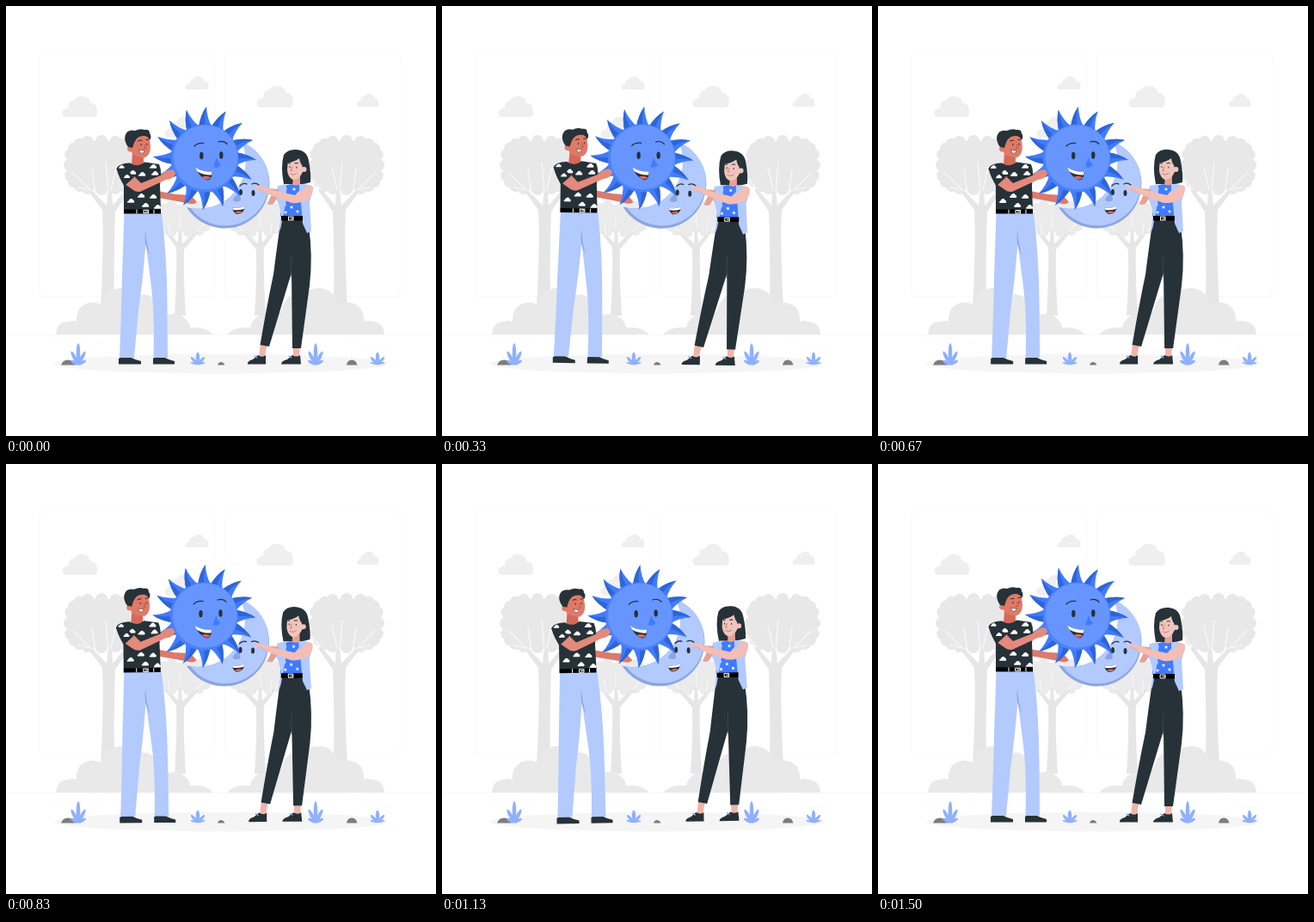
Animation of 500 by 500 pixels, one loop 1540 ms. Source, as an HTML page:

```html
<!DOCTYPE html>
<html lang="en">
<head>
<meta charset="utf-8">
<title>Sun and moon</title>
<style>
html, body { margin: 0; width: 100%; height: 100%; overflow: hidden; background: #fff; }
svg { display: block; width: 100vw; height: 100vh; }
.line { fill: none; stroke-linecap: round; stroke-linejoin: round; }
</style>
</head>
<body>
<svg viewBox="0 0 500 500">
  <defs>
    <path id="cloud" d="M4 24a4.500 4.500 0 0 1-1-8.500Q5 13 8 13.500Q7 5 14 5Q18-1 25 0Q32 1 33 8Q41 8 41 17Q42 24 37 24z"/>
    <path id="star" d="M0-3L.8-1 3-.9 1.3.5 1.9 2.6 0 1.4-1.9 2.6-1.3.5-3-.9-.8-1z"/>
    <g id="plant" fill="#8fb0ff">
      <ellipse cy="-13" rx="2.300" ry="12"/>
      <ellipse cy="-9" rx="2.100" ry="8.500" transform="rotate(-28)"/>
      <ellipse cy="-9" rx="2.100" ry="8.500" transform="rotate(28)"/>
      <ellipse cy="-5" rx="1.800" ry="5" transform="rotate(-62)"/>
      <ellipse cy="-5" rx="1.800" ry="5" transform="rotate(62)"/>
    </g>
    <g id="bigTree">
      <g id="bigLeaves" fill="#e8e8e8"/>
      <path fill="#e6e6e6" d="M110 350Q114 280 112 237L95 214l3-2 19 20 2-20h4l1 20 17-20 3 2-17 25Q125 290 126 350z"/>
      <path class="line" stroke="#f5f5f5" stroke-width="1.6" d="M98 214L78 194M104 219L100 190M99 214L84 211M119 216L116 182M122 214L128 188M141 213L153 198"/>
    </g>
    <g id="smallTree">
      <g id="smallLeaves" fill="#ebebeb"/>
      <path fill="#e6e6e6" d="M196 360Q199 310 198 281L184 262l2-2 14 15 1-17h3l1 18 17-15 2 2-17 20Q206 315 209 360z"/>
      <path class="line" stroke="#f5f5f5" stroke-width="1.3" d="M185 262L177 251M190 266L189 251M202 260V242M222 262L231 252"/>
    </g>
    <path id="bush" fill="#e9e9e9" d="M58 382q1-15 15-15q4-2 9 0q-1-19 16-22q8-1 13 3q4-18 22-20q14 0 19 9q20-7 26 18q4 3 5 6q12-6 22 0q8 5 9 13q18-2 27 8z"/>
    <clipPath id="crescent"><path d="M274 158A52.200 52.200 0 1 1 210 234A55 55 0 0 0 274 158z"/></clipPath>
  </defs>

  <g fill="none" stroke="#ebebeb" stroke-width=".3">
    <rect x="38.5" y="55" width="204" height="282.6" rx="5.6"/>
    <rect x="254.7" y="55" width="204" height="282.6" rx="5.6"/>
    <path d="M0 382.4H500M417 398.6h33M322 401.3h9M396.6 389.3h19M52.5 391h43M104.6 391h6M131.5 395.2h94"/>
  </g>
  <g fill="#efefef">
    <use href="#cloud" transform="translate(65 105)"/>
    <use href="#cloud" transform="translate(208 82) scale(.67 .63)"/>
    <use href="#cloud" transform="translate(291 93) scale(1.04)"/>
    <use href="#cloud" transform="translate(407.500 102) scale(.63)"/>
    <use href="#cloud" transform="translate(184 129)"/>
  </g>
  <use href="#bigTree"/>
  <use href="#bigTree" transform="matrix(-1 0 0 1 507 0)"/>
  <use href="#smallTree"/>
  <use href="#smallTree" transform="matrix(-1 0 0 1 498 0)"/>
  <use href="#bush"/>
  <use href="#bush" transform="matrix(-1 0 0 1 498 0)"/>

  <ellipse cx="250" cy="416" rx="194" ry="11.2" fill="#f5f5f5"/>
  <path fill="#7d7d7d" d="M64 417.500q2-6 8-6q6 0 9 6zM246 417.500q1-3.500 4-3.500t4.500 3.500zM396 417.500q1-6 6-6t6.500 6z"/>
  <use href="#plant" transform="translate(84 417)"/>
  <use href="#plant" transform="translate(223 417) scale(.95 .58)"/>
  <use href="#plant" transform="translate(360 417)"/>
  <use href="#plant" transform="translate(432 417) scale(.95 .58)"/>

  <g id="sway">
    <g id="moon">
      <g clip-path="url(#crescent)">
        <circle cx="257" cy="208" r="56" fill="#8ca5e2"/>
        <circle cx="255" cy="204.500" r="50.800" fill="#b3caff"/>
      </g>
      <path fill="#8ca5e2" d="M272 217Q264 222 264 226Q268 229 273 226z"/>
      <g fill="#263238">
        <ellipse cx="273" cy="216.500" rx="2" ry="3.500"/>
        <ellipse cx="287.500" cy="217.500" rx="2" ry="3.500"/>
        <path d="M263 234.500Q271 236 278 232.500Q277 242 268 242Q264 240 263 234.500z"/>
      </g>
      <path fill="#fff" d="M263 234.500Q271 236 278 232.500L277 236Q270 238 264 237z"/>
      <path fill="#e0685c" d="M266 240.500Q270 237 275 239.500Q271 242.500 266 240.500z"/>
      <path class="line" stroke="#263238" stroke-width="1.300" d="M272 209Q276 205 280 207M286 207Q290 205 294 208"/>
    </g>

    <path id="backArm" fill="#dc7a6b" d="M176 215L198 219Q209 219 216 221L222 228Q220 231 214 230L199 227L177 223z"/>

    <g id="sun">
      <g id="rays"/>
      <circle cx="231" cy="177" r="39.500" fill="#4a82f7"/>
      <circle cx="232" cy="176" r="37.500" fill="#6695ff"/>
      <path fill="#407bff" d="M245 176Q246 181 250 185Q247 189 241 187z"/>
      <g fill="#263238">
        <ellipse cx="227.300" cy="174" rx="2.200" ry="4.200"/>
        <ellipse cx="250.300" cy="173.500" rx="2.200" ry="4.200"/>
        <path d="M220 187.500Q229 193.500 239.500 192.500Q240 202 234 202.500Q225 199.500 220 187.500z"/>
      </g>
      <path fill="#fff" d="M220 187.500Q229 193.500 239.500 192.500L239 196.500Q230 197 222.500 192.500z"/>
      <path fill="#e0685c" d="M228 199Q232 196.500 238.500 199.500Q234 204 228 199z"/>
      <path class="line" stroke="#263238" stroke-width="1.200" d="M219 163Q223 158.500 230 159.500M247 158Q253 156 257 160.500"/>
    </g>

    <g id="man">
      <path fill="#263238" d="M131 416.500V410L134 408.500H145Q151 412 157 413V416.500zM171 416.500V410L173 408.500H184Q190 412 196 413V416.500z"/>
      <path fill="#b3caff" d="M137.500 241H181Q187 290 187.500 345L188 409H171.500Q173 360 169 327L162.500 276Q159 320 154.500 350L149 409H132Q134 360 135 315z"/>
      <path fill="#8ca5e2" d="M162 261Q161 275 163 280L167 290Q163 276 162 261z"/>
      <path fill="#d5695a" d="M147 172H160V185Q153 189 146 184z"/>
      <path fill="#263238" d="M144 182.500Q131 183 128.500 189L137 209V237H180L179 208Q182 193 178 184L161 181.500Q153 188.500 144 182.500z"/>
      <g id="shirtClouds" fill="#fff"/>
      <path fill="#000" d="M137 236.500H180V241.500H137z"/>
      <path class="line" stroke="#fff" stroke-width="1" d="M160 237.300h5.500v3.500H160zM162 239h2.500M152 237v4M172 237v4"/>
      <path fill="#e4897b" d="M138 207L149 198L157 206L180 197Q185 191 193 190Q197 192 197 195Q195 201 186 202L157 215.500Q152 217 148 214z"/>
      <path fill="#263238" d="M128.500 189Q133 186 139 189L149 199L138 209Q132 202 128.500 189z"/>
      <g fill="#fff">
        <use href="#cloud" transform="translate(131 185) scale(.16)"/>
        <use href="#cloud" transform="translate(137 196) scale(.17)"/>
      </g>
      <path fill="#e07a66" d="M144 155Q154 146 166 150L168 163Q168 173 162 176Q154 177 147 172Q143 165 144 155z"/>
      <circle cx="144.500" cy="166" r="3.400" fill="#e07a66"/>
      <path fill="#263238" d="M142 164Q137 157 138.500 151Q141 143 150 145Q156 142 161 144Q167 143 167 148Q170 152 167 156Q165 151 160 151Q152 151 149 159L147 165z"/>
      <path class="line" stroke="#263238" stroke-width="1" d="M154 157Q156 155.500 158 156.500M163 155.500h2.500M157 160.500v1.500M164 160v1.500"/>
      <path class="line" stroke="#c95549" stroke-width="1" d="M161 161L163 165.500H160"/>
      <path fill="#fff" stroke="#263238" stroke-width=".5" d="M154.500 167Q158 169 161 167.500Q160 172 156.500 171z"/>
    </g>

    <g id="woman">
      <path fill="#f0b4aa" d="M296 392H304L301 407H294zM334 395H342L341 408H334z"/>
      <path fill="#263238" d="M281 416.500Q280 413 287 411L293 406Q298 409 302 406L302 416.500zM320 416.500Q320 413 327 411L333 406Q338 409 342 406L343 416.500z"/>
      <path class="line" stroke="#7ea3ff" stroke-width="1.200" d="M289 407l3 2M329 407l3 2"/>
      <path fill="#263238" d="M320 248H345L352 256Q357 290 353 325L343 398H333L332 310L306 396L295.500 394Q303 350 311 312Q317 265 320 248z"/>
      <path class="line" stroke="#37474f" stroke-width="1" d="M332 290Q331 302 332 315"/>
      <path fill="#263238" d="M323 173Q328 166 338 167Q350 168 352 180Q355 195 354 205Q345 208 336 207H323Q319 187 323 173z"/>
      <path fill="#e6a195" d="M334 198H342V209Q338 213 333 209z"/>
      <path fill="#efc5bd" d="M328 178Q335 174 344 178L345 193Q341 202 334 202Q328 200 327 191z"/>
      <circle cx="346.500" cy="190" r="3" fill="#efc5bd"/>
      <path fill="#263238" d="M326 183Q329 170 340 171Q347 174 346 187Q342 184 341 177Q336 181 326 183z"/>
      <path class="line" stroke="#263238" stroke-width="1" d="M328.500 183h2M336 183q2-1 3.500 0M330 186.500v1.200M338 187v1.200"/>
      <path class="line" stroke="#d97f73" stroke-width="1" d="M333 187L331 191.500H333M331 195Q335 197.500 338 194.500"/>
      <path fill="#407bff" d="M322 209L332 207Q337 210 342 207L349 209L345 245H319z"/>
      <g id="stars" fill="#fff"/>
      <path fill="#b3caff" d="M326 207L316 209L313 222L317 230L320 242L317 262Q319 263 321 250L326 225zM341 207L353 208L357 214L353 228L355 262L350 264L345 253Q343 230 341 207z"/>
      <path fill="#000" d="M320 244H345V249.500H320z"/>
      <path class="line" stroke="#fff" stroke-width="1" d="M328.500 245h5.500v4h-5.500zM331 247h3"/>
      <path fill="#e6a195" d="M318 219L311 230Q307 232 304 230L309 219L304 212L317 213z"/>
      <path fill="#f3beb4" d="M346 209Q353 207 357 210Q358 219 351 225Q341 230 332 229L308 220Q302 218 300 215L290 213Q288 210 292 209L304 211Q310 214 314 215L336 220z"/>
      <path fill="#b3caff" d="M341 207L350 207.500L345 215L341 217z"/>
      <path class="line" stroke="#e6a195" stroke-width=".7" d="M300 215L294 213M302 216L298 218"/>
    </g>
  </g>
</svg>
<script>
const $ = id => document.getElementById(id);
const TAU = Math.PI * 2;

// Scalloped foliage: a rounded box ringed with small circles.
function leaves(id, cx, cy, rx, ry, count, r) {
  const bulge = v => Math.sign(v) * Math.abs(v) ** .7;
  let out = `<rect x="${cx - rx}" y="${cy - ry}" width="${rx * 2}" height="${ry * 2}" rx="${ry * .7}"/>`;
  for (let i = 0; i < count; i++) {
    const a = i / count * TAU;
    out += `<circle cx="${cx + rx * bulge(Math.cos(a))}" cy="${cy + ry * bulge(Math.sin(a))}" r="${r}"/>`;
  }
  $(id).innerHTML = out;
}
leaves('bigLeaves', 111, 185, 37, 28, 20, 7);
leaves('smallLeaves', 206, 247, 28, 16, 13, 6);

const scatter = (id, shape, scale, places) => {
  $(id).innerHTML = places.map(([x, y]) =>
    `<use href="#${shape}" transform="translate(${x} ${y}) scale(${scale})"/>`).join('');
};
scatter('shirtClouds', 'cloud', .2, [[143, 191], [154, 193], [167, 184], [169, 192],
  [141, 224], [158, 229], [167, 219], [153, 218], [172, 231]]);
scatter('stars', 'star', .75, [[325, 213], [335, 213], [329, 222], [338, 224],
  [324, 231], [332, 234], [339, 239], [325, 240]]);

function drawRays() {
  const count = 16, half = TAU / count / 2;
  const at = (r, a) => `${(231 + r * Math.cos(a)).toFixed(1)} ${(177 + r * Math.sin(a)).toFixed(1)} `;
  let out = '';
  for (let i = 0; i < count; i++) {
    const a = -1.535 + i * half * 2;
    const tip = at(60, a), left = at(37, a - half * 1.15), right = at(37, a + half);
    const edge = at(51, a - half * .65);
    out += `<path fill="#407bff" d="M${left}Q${edge}${tip}Q${at(47, a + half * .1)}${right}z"/>` +
      `<path fill="#2f65d6" d="M${left}Q${edge}${tip}Q${at(47, a - half * .3)}${at(37, a - half * .1)}z"/>`;
  }
  $('rays').innerHTML = out;
}
drawRays();

const LOOP = 1540, PERIOD = 1500, PHASE = 50;

// Triangle wave in degrees: 0, 1 at a quarter, -1 at three quarters.
function wave(ms) {
  const u = ms / PERIOD % 1;
  return u < .25 ? 4 * u : u < .75 ? 2 - 4 * u : 4 * u - 4;
}

function draw(now) {
  const t = Math.min(now % LOOP, PERIOD);
  const angle = wave(t + PHASE) - wave(PHASE);
  $('sway').setAttribute('transform', `rotate(${angle.toFixed(4)} 242.5 267)`);
  requestAnimationFrame(() => draw(performance.now() - start));
}
const start = performance.now();
draw(0);
</script>
</body>
</html>
```
